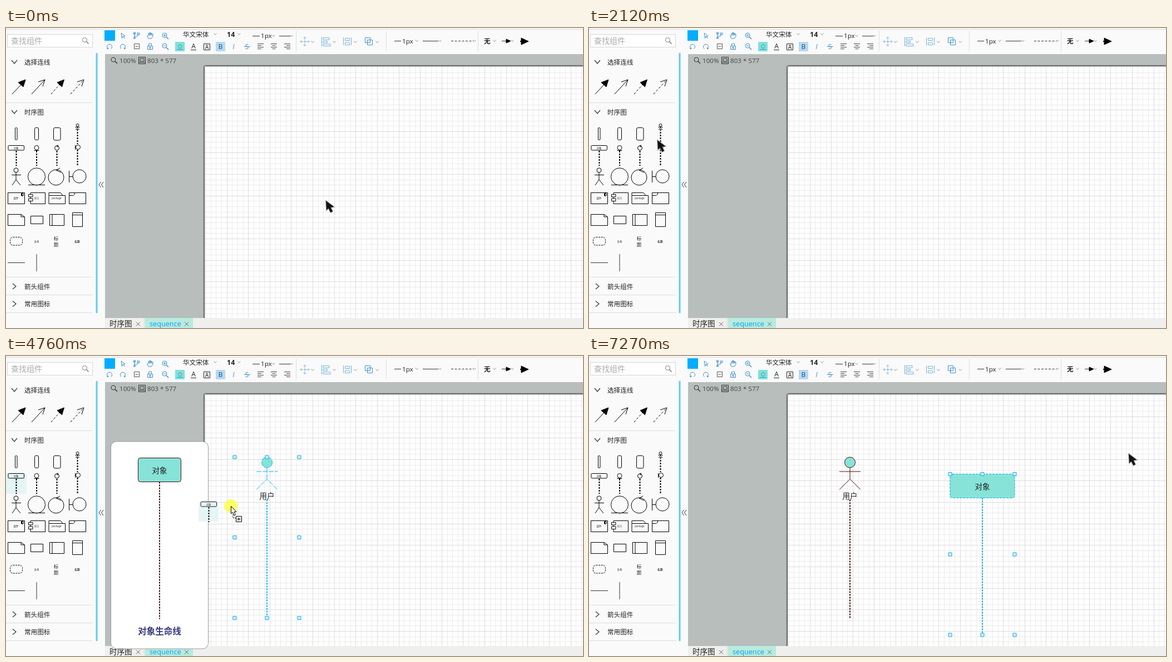
Animation, 1037 px wide and 540 px high, one loop 7.33 s. Source, as an HTML page:

```html
<!DOCTYPE html>
<html lang="zh">
<head>
<meta charset="utf-8">
<style>
html, body { margin: 0; width: 100%; height: 100%; overflow: hidden; background: #fafafa; }
svg { display: block; fill: none; stroke: #000; font: 11.6px "Open Sans", "Noto Sans CJK SC", "Noto Sans CJK", sans-serif; }
text { fill: #222; stroke: none; }
.mid { text-anchor: middle; }
.tiny { font-size: 4.5px; text-anchor: middle; }
.rule { stroke: #d6d6d6; }
.blue { stroke: #3c8fd0; }
.pale { stroke: #74b3dc; }
.chev { stroke: #999; }
.dots { stroke-width: 2; stroke-dasharray: 3 2; }
.dark { stroke: #420808; }
.mint { fill: #87e3d8; }
.label { font-size: 13.5px; text-anchor: middle; }
.title { font-size: 15.5px; font-weight: bold; text-anchor: middle; fill: #38387f; }
.card { fill: #fff; stroke: #999; }
.hover { fill: #e5f4f4; stroke: none; }
.picked { stroke: #08b0ec; }
.handle { fill: #d4f0ff; stroke: #08aaf2; }
.page { fill: #fff; stroke: none; filter: drop-shadow(0 0 1.5px #000) drop-shadow(0 0 1px #333); }
</style>
</head>
<body>
<svg width="1037" height="540" viewBox="0 0 1037 540">
<defs>
  <path id="down" d="M-2.5 -1.5L0 1.5L2.5 -1.5" class="chev"/>
  <path id="fold" d="M-5 -3L0 3L5 -3" stroke="#333" stroke-width="1.2"/>
  <g id="lens"><circle r="4"/><path d="M3 3L7 7" stroke-width="1.5"/></g>
  <g id="actor">
    <circle cy="10" r="9.5" class="mint"/>
    <path d="M0 20V40M-19 26.500H19M-19 59L0 40L19 59"/>
    <path d="M0 77V290" class="dots"/>
    <text y="75" class="label">用户</text>
  </g>
  <g id="object">
    <path d="M0 43V290" class="dots"/>
    <text y="27" class="label" font-weight="500">对象</text>
  </g>
  <g id="actorIcon">
    <circle cx="18.500" cy="3" r="2.500"/>
    <path d="M18.500 5.500V8M14.500 6.500H22.500M15 11L18.500 8L22 11"/>
    <path d="M18.500 10V37" class="dots"/>
  </g>
  <g id="objectIcon">
    <rect x="4" y=".5" width="28.500" height="8.500" rx="1.500"/>
    <text x="18" y="6.500" class="tiny">对象</text>
    <path d="M18.500 10V37" class="dots"/>
  </g>
  <clipPath id="cell"><path d="M0 -1H37V37H0Z"/></clipPath>
</defs>

<!-- panels -->
<g stroke="none">
  <path fill="#fafafa" d="M0 0H1037V540H0Z"/>
  <path fill="#b8bebc" d="M178 47H1037V522H178Z"/>
  <path fill="#62c9f5" d="M161.500 45H164.500V513H161.500Z"/>
  <path fill="#efefee" d="M178 522H1037V540H178Z"/>
  <path fill="#b7ebdf" d="M250 522H336V540H250Z"/>
</g>
<path class="rule" d="M0 2.500H1037M0 134.500H156M0 448.500H156M0 480.500H156M0 512.500H156M248.500 522V540M521.500 5V42M683.500 5V42M848.500 5V42" opacity=".8"/>

<!-- page -->
<svg x="178" y="47" width="859" height="475" viewBox="178 47 859 475">
  <path class="page" d="M357 69H1050V540H357Z"/>
  <path id="minor" stroke="#ebebeb"/>
  <path id="major" stroke="#dcdcdc"/>
</svg>
<g stroke="#333"><use href="#lens" x="193" y="57"/>
  <path d="M238.500 52.500H250.500V64.500H238.500ZM241 55H248V60H241ZM239 62H250"/></g>
<text x="204" y="62.500" style="fill:#444">100%</text>
<text x="254" y="62.500" style="fill:#444">803 * 577</text>
<text x="186" y="537" font-size="13.5">时序图</text>
<text x="258" y="537" font-size="12.7" style="fill:#0a9cf5">sequence</text>
<path stroke="#666" d="M234 529.500L241 536.500M241 529.500L234 536.500M321 529.500L328 536.500M328 529.500L321 536.500"/>

<!-- sidebar -->
<rect x="2.500" y="11.500" width="153" height="23" fill="#fff" class="rule"/>
<text x="9" y="28" font-size="14" style="fill:#aaa">查找组件</text>
<use href="#lens" x="141.500" y="21.500" stroke="#777"/>
<use href="#fold" x="15" y="61"/><text x="33" y="65.500">选择连线</text>
<use href="#fold" x="15" y="151"/><text x="33" y="155.500">时序图</text>
<use href="#fold" transform="translate(15 465)rotate(-90)"/><text x="33" y="469.500">箭头组件</text>
<use href="#fold" transform="translate(15 496.500)rotate(-90)"/><text x="33" y="501">常用图标</text>
<path d="M11 119L28 101M46 119L70 93M58 97L70 93L66 105"/>
<path d="M81 119L97 101M116 119L140 93" stroke-dasharray="4 3"/>
<path d="M128 97L140 93L136 105"/>
<path fill="#000" d="M35 93L31 106L22 98ZM104.500 93L100.500 106L92 98Z"/>

<path id="hoverActor" class="hover" d="M110 172H147V209H110Z"/>
<path id="hoverObject" class="hover" d="M0 211H37V248H0Z"/>
<path id="hoverBoundary" class="hover" d="M110 211H147V248H110Z"/>

<rect x="16.500" y="179.500" width="3.500" height="22" rx="1.500"/>
<rect x="51.500" y="179.500" width="7" height="22" rx="2"/>
<rect x="85.500" y="179.500" width="12.500" height="22.500" rx="2.500"/>
<use href="#actorIcon" x="110" y="172"/>
<use href="#objectIcon" y="211"/>
<circle cx="55" cy="215.500" r="4"/><circle cx="91.500" cy="216" r="4"/><circle cx="129.500" cy="214.500" r="4"/>
<path d="M50.500 220.500H59.500M94 210.500L91 212.500L94 214M124.500 211V219M124.500 214.500H126"/>
<path class="dots" d="M55 221V248M91.500 221V248M128.500 219V248"/>

<circle cx="18" cy="256" r="4"/><circle cx="55" cy="267.500" r="15.500"/><circle cx="90" cy="269" r="14"/><circle cx="132" cy="267" r="12"/>
<path d="M18 260V273M10 264.500H27M11 283L18 273L26 283M40 282.500H70M97 252L90 256L99 260M113.500 257V278M113.500 267.500H120"/>

<path d="M3.500 296.500H33.500V316.500H3.500ZM44 299V296.500H70.500V316.500H44V312M40.500 299.500H48V304H40.500ZM40.500 307H48V311.500H40.500ZM44 304V307
  M77 301.500V296.500H98L102 301.500M77 301.500H106.500V316.500H77ZM113.500 296.500H143.500V316.500H113.500ZM113.500 301.500H121L123.500 299V296.500"/>
<rect x="27.500" y="297.500" width="4" height="4.500" rx="1"/><path d="M28.500 297.500V302.500" stroke-width="2"/>
<text x="18" y="308" class="tiny">组件</text><text x="55" y="308" class="tiny" opacity=".6">模块</text><text x="91" y="308" class="tiny">package</text>

<path d="M3.500 335.500H27L33.500 340V355.500H3.500ZM27 335.500V340H33.500M44.500 338.500H66.500V352.500H44.500ZM78.500 335.500H104.500V355.500H78.500ZM83 335.500V355.500M119.500 332.500H137.500V357.500H119.500ZM119.500 336.500H137.500"/>
<rect x="7.500" y="376.500" width="22" height="14.500" rx="5" stroke-dasharray="3 1.500"/>
<text x="55" y="385.500" class="tiny">文本</text><text x="128" y="385.500" class="tiny" font-weight="bold">标题</text>
<text x="90" y="382" class="mid" font-size="8.500">标</text><text x="90" y="392.500" class="mid" font-size="8.500">题</text>
<path d="M3 422.500H34M55 407V438" stroke="#333"/>
<path d="M170.500 277L167 282L170.500 287M175 277L171.500 282L175 287" stroke="#333"/>

<!-- toolbar -->
<path fill="#00adff" stroke="none" d="M177 4H196V23H177Z"/>
<path fill="#7fe2d9" stroke="none" d="M304 25H321V42H304Z"/>
<path fill="#b9d9ee" stroke="none" d="M377 25H394V42H377Z"/>
<g class="blue">
  <path d="M207 9L214 14.500L210.500 15L208.500 18.500ZM211 15L213 19M231 9V18M231 15H236L238 11M236 9H240V12H236ZM229.500 8H232.500V11H229.500ZM229.500 17H232.500V19H229.500Z"/>
  <path d="M256 19L253.500 14L256 14V10L258 9V13V8.500H260V13V9.500H262V13V11H264V15L261 19Z"/>
  <path d="M183.500 37.500A4.500 4.500 0 1 1 188.500 37.500M183.500 37.500H181M183.500 37.500V35M207.500 37.500A4.500 4.500 0 1 1 212.500 37.500M212.500 37.500H215M212.500 37.500V35"/>
  <path d="M254.500 32.500H263.500V38.500H254.500ZM256.500 32V28.500H261.500V32M257 35.500H261M259 32V38"/>
  <use href="#lens" x="285" y="13"/><use href="#lens" x="285" y="32"/>
  <path d="M283 13H287.500M285 11V15M283 32H287.500"/>
  <path d="M309 33L313 29L316.500 33L313 37ZM307.500 38.500H318M428 33.500H439"/>
</g>
<path stroke="#555" d="M230.500 28.500H239.500V37.500H230.500ZM232.500 33H237.500"/>
<text x="318" y="15.500">华文宋体</text><text x="397" y="16" font-size="12.500" font-weight="bold">14</text>
<g class="mid" font-size="12">
  <text x="337" y="37">A</text><text x="361" y="37.500" font-size="10.500">A</text>
  <text x="385.500" y="38" font-weight="600" style="fill:#3478b5">B</text>
  <text x="409" y="38" font-style="italic" style="fill:#3c8fd0">I</text><text x="433" y="38" style="fill:#3c8fd0">S</text>
</g>
<path stroke="#222" d="M332 39.500H342M355.500 28.500H366.500V39.500H355.500Z"/>
<path stroke="#444" d="M452 28.500H463M452 31.500H459M452 34.500H463M452 37.500H459M476 28.500H487M478.500 31.500H484.500M476 34.500H487M478.500 37.500H484.500M500 28.500H511M504 31.500H511M500 34.500H511M504 37.500H511"/>
<path stroke="#333" d="M443 14.500H456M491 14.500H511M698 23.500H710M749 23.500H777M891 23.500H901"/>
<path stroke="#333" d="M800 23.500H840" stroke-dasharray="4 2.500"/>
<text x="458" y="18">1px</text><text x="712" y="27.500">1px</text><text x="859" y="27.500" font-weight="bold">无</text>
<path fill="#000" d="M899 20L907 23.500L899 27ZM926 18L939 24L926 30Z"/><path d="M924 24H927" stroke-width="2"/>
<g class="pale">
  <path d="M529 24.500H545M537 16V32.500M531.500 22L529 24.500L531.500 27M542.500 22L545 24.500L542.500 27M534.500 18.500L537 16L539.500 18.500M534.500 30L537 32.500L539.500 30" stroke-dasharray="5 1"/>
  <path d="M567.500 16V33M570 17.500H581V21H570ZM570 23.500H577.500V26.500H570ZM570 29H583V32.500H570Z"/>
  <path d="M606.500 17V31M620.500 17V31M609.500 18.500H617.500V22.500H609.500ZM609.500 26.500H617.500V30.500H609.500Z"/>
  <path class="blue" d="M645.500 17.500H654.500V26.500H645.500ZM649.500 21.500H658.500V30.500H649.500Z"/>
</g>
<g id="chevrons"></g>

<!-- placed shapes -->
<g id="placedActor"><use href="#actor" x="469" y="181.500" class="dark"/></g>
<g id="pickedActor"><use href="#actor" x="469" y="181.500" class="picked" stroke-dasharray="9 2"/><path class="handle" data-box="469 182"/></g>
<g id="placedObject">
  <rect x="649" y="212.500" width="116" height="43" rx="4" class="mint picked" stroke-dasharray="4 2"/>
  <use href="#object" x="707" y="212.500" class="picked"/>
</g>
<path id="pickedObject" class="handle" data-box="707 212.500"/>

<!-- previews -->
<g id="actorCard">
  <rect x="188.500" y="146.500" width="190.500" height="373" rx="10" class="card"/>
  <use href="#actor" x="284" y="176" class="dark"/>
  <text x="284" y="493.500" class="title">参与者生命线</text>
</g>
<g id="objectCard">
  <rect x="188.500" y="154" width="175" height="373" rx="10" class="card"/>
  <rect x="237.500" y="183.500" width="77" height="43" rx="4" class="mint dark"/>
  <use href="#object" x="276" y="183.500" class="dark"/>
  <text x="276" y="501" class="title">对象生命线</text>
</g>
<g id="boundaryCard">
  <rect x="188.500" y="174.500" width="206" height="373" rx="10" class="card"/>
  <g class="dark"><circle cx="298" cy="224" r="19" class="mint"/><path d="M263.500 208V240M263.500 224H279"/><path d="M298 243V494" class="dots"/></g>
  <text x="292" y="521" class="title">边界生命线</text>
</g>

<!-- pointer -->
<g id="ghost" opacity=".9" clip-path="url(#cell)">
  <path class="hover" d="M0 0H36V36H0Z"/>
  <use id="ghostActor" href="#actorIcon"/><use id="ghostObject" href="#objectIcon"/>
</g>
<g id="pointer">
  <path id="arrow" fill="#111" stroke="#b4b4b4" stroke-width="2" paint-order="stroke" d="M0 0L1 17L4.500 13.500L8.500 21L12 19L8.500 12L14.500 11Z"/>
  <g id="copy">
    <circle r="12" fill="#ff3" stroke="none" opacity=".75"/>
    <path fill="#fff" d="M.5 .5V14L3.500 11L6 17L8.500 16L6 10.500H10Z"/>
    <path d="M4 14.500V21.500H11" stroke-dasharray="1.500 1"/>
    <path fill="#fff" d="M9.500 18.500H19.500V28.500H9.500ZM11.500 23.500H17.500M14.500 20.500V26.500"/>
  </g>
  <path id="move" fill="#fff" d="M0 -11L4 -6.500H1.500V-1.500H6.500V-4L11 0L6.500 4V1.500H1.500V6.500H4L0 11L-4 6.500H-1.500V1.500H-6.500V4L-11 0L-6.500 -4V-1.500H-1.500V-6.500H-4Z"/>
</g>
</svg>
<script>
const LOOP = 7330, FIRST = 150, TICK = 131;
const $ = id => document.getElementById(id);
const show = (id, on) => { $(id).style.display = on ? '' : 'none'; };
const place = (id, x, y) => $(id).setAttribute('transform', `translate(${x} ${y})`);

// grid: every fourth line is a major one
const SPACING = 9.656;
const grid = { minor: '', major: '' };
for (let i = 0; i < 72; i++) {
  const x = Math.round(358 + i * SPACING) + .5, y = Math.round(70 + i * SPACING) + .5;
  grid[i % 4 ? 'minor' : 'major'] += `M${x} 69V522M357 ${y}H1037`;
}
for (const id in grid) $(id).setAttribute('d', grid[id]);

const chevrons = { 11: [376, 419], 14: [481, 513], 23: [738, 780, 842, 878, 910], 25: [551, 590, 628, 667] };
$('chevrons').innerHTML = Object.entries(chevrons)
  .flatMap(([y, xs]) => xs.map(x => `<use href="#down" x="${x}" y="${y}"/>`)).join('');

for (const el of document.querySelectorAll('[data-box]')) {
  const [cx, top] = el.dataset.box.split(' ').map(Number);
  let d = '';
  for (const dx of [-58, 0, 58]) for (const dy of [0, 144.5, 289.5])
    if (dx || dy !== 144.5) d += `M${cx + dx - 3} ${top + dy - 3}h6v6h-6z`;
  el.setAttribute('d', d);
}

// pointer path: tick, x, y
const path = [
  [0, 575, 311], [2, 520, 292], [4, 330, 235], [6, 150, 197], [7, 143, 189], [8, 136, 200],
  [10, 142, 235], [11, 113, 229], [13, 38, 224], [16, 123, 202], [18, 125, 186], [19, 128, 187],
  [22, 426, 212], [25, 469, 181], [26, 430, 190], [27, 250, 228], [29, 110, 231], [31, 28, 228],
  [32, 23, 227], [34, 11, 219], [35, 143, 270], [36, 404, 270], [40, 667, 223], [42, 695, 222],
  [44, 705, 211], [45, 706, 211], [48, 855, 215], [51, 1016, 195], [54, 984, 172], [55, 970, 176]
];
function pointerAt(tick) {
  const i = Math.max(1, path.findIndex(p => p[0] >= tick));
  const [t0, x0, y0] = path[i - 1], [t1, x1, y1] = path[i];
  const k = (tick - t0) / (t1 - t0);
  return [x0 + (x1 - x0) * k, y0 + (y1 - y0) * k];
}

function draw(now) {
  const t = now % LOOP;
  const tick = t < FIRST ? 0 : Math.min(55, 1 + Math.floor((t - FIRST) / TICK));
  const within = (a, b) => tick >= a && tick <= b;
  const dragActor = within(19, 25), dragObject = within(35, 44), dragging = dragActor || dragObject;

  show('hoverActor', within(7, 8) || within(18, 25));
  show('hoverBoundary', within(9, 11) || tick === 17);
  show('hoverObject', within(13, 14) || within(31, 44));
  show('actorCard', within(7, 8) || within(18, 26));
  place('actorCard', 0, tick > 8 ? 14 : 0);
  show('boundaryCard', within(9, 11) || tick === 17);
  show('objectCard', within(13, 14) || within(31, 44));

  show('placedActor', tick === 26 || tick >= 46);
  show('pickedActor', within(27, 45));
  show('placedObject', tick >= 45);
  show('pickedObject', tick >= 46);

  place('pointer', ...pointerAt(tick));
  show('arrow', !dragging && tick !== 27);
  show('copy', dragging);
  show('move', tick === 27);

  // the dragged cell trails the pointer a little
  const [gx, gy] = pointerAt(Math.max(0, tick - .18));
  place('ghost', gx - (dragActor ? 15 : 11), gy - (dragActor ? 14 : 8));
  show('ghost', dragging);
  show('ghostActor', dragActor);
  show('ghostObject', dragObject);
  requestAnimationFrame(draw);
}
draw(performance.now());
</script>
</body>
</html>
```
